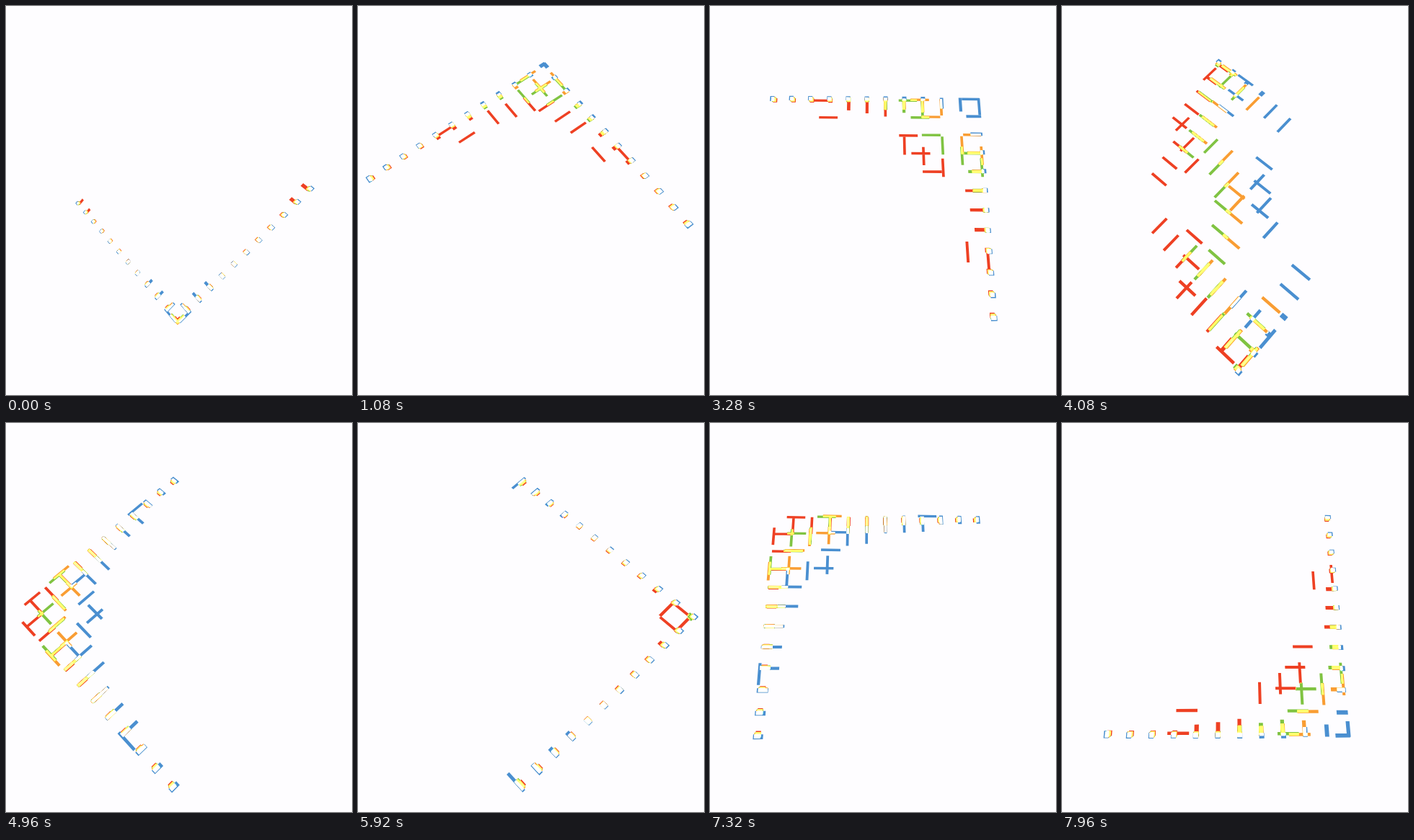
Recreate the animation shown at these times as an HTML page with a canvas. Size 480 by 540 pixels, loop 8000 ms.

```html
<!DOCTYPE html>
<html lang="en">
<head>
<meta charset="utf-8">
<title>Grid wave</title>
<style>
  html, body { margin: 0; width: 100%; height: 100%; overflow: hidden; background: #fefdff; }
  canvas { display: block; width: 480px; height: 540px; }
</style>
</head>
<body>
<canvas id="stage" width="480" height="540"></canvas>
<script>
const ctx = document.getElementById('stage').getContext('2d');
const LOOP = 8000, LAST = 11, GROUP = 2.8, CYCLE = 9.6;
const CENTER = { x: 231, y: 275 };

// Each later colour trails the one before it and sits a little further out.
const LAYERS = [
  { color: '#ee4023', lag: 0, scale: 0.983 },
  { color: '#80c342', lag: 2, scale: 0.992 },
  { color: '#f99d33', lag: 3, scale: 1.0 },
  { color: '#4a8fd0', lag: 5, scale: 1.011 }
];

// Corners of the grid in order: start, clockwise neighbour, opposite, last.
const TILTED = [[238, 440], [100, 274], [238, 112], [422, 254]];
const DOWN = [[226, 502], [10, 268], [231, 82], [462, 268]];
const UPRIGHT = [[63, 434], [88, 128], [371, 131], [395, 432]];
const SIDE = [[8, 264], [231, 79], [465, 269], [229, 507]];
const TURNED = [[88, 128], [370, 132], [396, 432], [63, 434]];
const POSES = [
  [0, TILTED], [850, DOWN], [1700, UPRIGHT], [3360, UPRIGHT],
  [4240, SIDE], [5920, SIDE], [6720, TURNED], [LOOP, TURNED]
];

// Wave progress against time, counted in groups that have left.
const PROGRESS = [
  [0, -1.1], [2080, 20.8], [3280, 30], [4960, 34.8],
  [5920, 47.4], [7320, 54], [7960, 68.2], [LOOP, 69]
];

const mix = (a, b, f) => a + (b - a) * f;
const smooth = f => f * f * (3 - 2 * f);

function segment(keys, time) {
  let i = 0;
  while (i < keys.length - 2 && time >= keys[i + 1][0]) i++;
  const [t0, from] = keys[i], [t1, to] = keys[i + 1];
  return { from, to, f: (time - t0) / (t1 - t0) };
}

function polar([x, y]) {
  const dx = x - CENTER.x, dy = y - CENTER.y;
  return { angle: Math.atan2(dy, dx), radius: Math.hypot(dx, dy) };
}

function cornersAt(time) {
  const { from, to, f } = segment(POSES, time);
  const e = smooth(f);
  return from.map((corner, i) => {
    const p = polar(corner), q = polar(to[i]);
    const turn = Math.atan2(Math.sin(q.angle - p.angle), Math.cos(q.angle - p.angle));
    const angle = p.angle + turn * e, radius = mix(p.radius, q.radius, e);
    return [CENTER.x + radius * Math.cos(angle), CENTER.y + radius * Math.sin(angle)];
  });
}

// Perspective map from grid cells to the stage.
function projector([start, next, opposite, last]) {
  const [x0, y0] = start, [x1, y1] = last, [x2, y2] = opposite, [x3, y3] = next;
  const dx1 = x1 - x2, dx2 = x3 - x2, dx3 = x0 - x1 + x2 - x3;
  const dy1 = y1 - y2, dy2 = y3 - y2, dy3 = y0 - y1 + y2 - y3;
  const det = dx1 * dy2 - dx2 * dy1;
  const g = (dx3 * dy2 - dx2 * dy3) / det, h = (dx1 * dy3 - dx3 * dy1) / det;
  return (a, b, scale) => {
    const u = a / LAST, v = b / LAST, w = g * u + h * v + 1;
    const x = ((x1 - x0 + g * x1) * u + (x3 - x0 + h * x3) * v + x0) / w;
    const y = ((y1 - y0 + g * y1) * u + (y3 - y0 + h * y3) * v + y0) / w;
    return [mix(CENTER.x, x, scale), mix(CENTER.y, y, scale)];
  };
}

// Neighbours leave in groups, with only a small delay inside each group.
function delay(order) {
  const exact = (order - 0.3) / GROUP;
  return mix(Math.round(exact), exact, 0.3);
}

// Sharp start, long soft landing.
function travel(step) {
  const x = step - 0.58;
  const z = x > 0 ? 1.6 * Math.pow(x, 0.75) : 2.5 * x;
  return LAST / (1 + Math.exp(-z));
}

function positionOf(progress, order) {
  const local = progress - delay(order);
  const turn = Math.floor((local + 1.5) / CYCLE);
  const done = travel(local - turn * CYCLE);
  return turn % 2 === 0 ? done : LAST - done;
}

function addStick(project, scale, pos, line, flipped) {
  const open = smooth(Math.min(1, Math.max(0, Math.min(pos, LAST - pos) / 0.5)));
  const half = mix(0.23, 1, open) / 2, thick = mix(0.23, 0.14, open) / 2;
  const box = [[-half, -thick], [half, -thick], [half, thick], [-half, thick]];
  if (flipped) box.reverse();
  box.forEach(([along, across], i) => {
    const a = pos + along, b = line + across;
    const [x, y] = flipped ? project(b, a, scale) : project(a, b, scale);
    if (i) ctx.lineTo(x, y); else ctx.moveTo(x, y);
  });
  ctx.closePath();
}

function draw(time) {
  const project = projector(cornersAt(time));
  const { from, to, f } = segment(PROGRESS, time);
  const progress = mix(from, to, f);
  ctx.globalCompositeOperation = 'source-over';
  ctx.clearRect(0, 0, 480, 540);
  ctx.globalCompositeOperation = 'lighter';
  for (const { color, lag, scale } of LAYERS) {
    ctx.fillStyle = color;
    ctx.beginPath();
    for (let line = 0; line <= LAST; line++) {
      const pos = positionOf(progress, LAST - line + lag);
      addStick(project, scale, pos, line, false);
      addStick(project, scale, pos, line, true);
    }
    ctx.fill();
  }
}

const begin = performance.now();
function tick() {
  draw((performance.now() - begin) % LOOP);
  requestAnimationFrame(tick);
}
tick();
</script>
</body>
</html>
```
